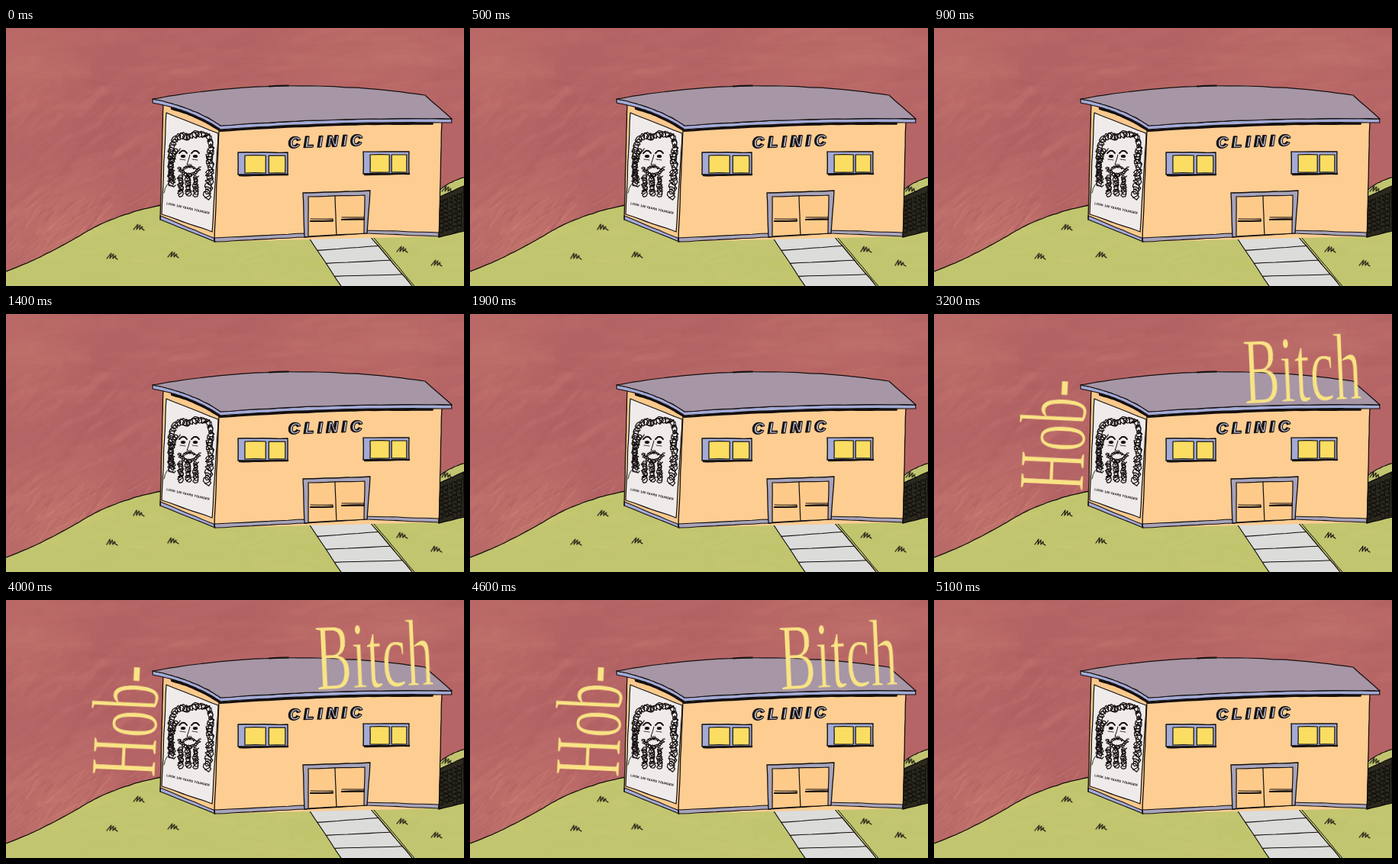
Recreate the animation shown at these times as an HTML page with a canvas. Size 600 by 338 pixels, loop 5200 ms.

```html
<!DOCTYPE html>
<html lang="en">
<head>
<meta charset="utf-8">
<title>Clinic</title>
<style>
  html, body { margin: 0; width: 100%; height: 100%; overflow: hidden; background: #b66566; }
  canvas, svg { position: absolute; left: 0; top: 0; width: 600px; height: 338px; }
  .title { font: 125px "Liberation Serif", "Times New Roman", serif; }
  .sign { font: italic bold 20px "Liberation Sans", Arial, sans-serif; letter-spacing: 5.8px; }
  .slogan { font: bold 4.2px "Liberation Sans", Arial, sans-serif; }
</style>
</head>
<body>
<canvas id="paint" width="600" height="338"></canvas>
<svg id="stage" viewBox="0 0 600 338"></svg>
<script>
const LOOP = 5200, STEP = 100;
const INK = '#14100f', WALL = '#fdcd92', SIDE = '#fac98c', BLUE = '#a3aad6',
      TRIM = '#a6a3bb', ROOF = '#a696a6', PANE = '#fbdd62', PAPER = '#efebea';

let seed = 11;
const rnd = () => (seed = (seed * 16807) % 2147483647) / 2147483647;
const span = (a, b) => a + rnd() * (b - a);
const mix = (a, b, t) => [a[0] + (b[0] - a[0]) * t, a[1] + (b[1] - a[1]) * t];

// Point lists: parse, bend between two ends, move, box.
const pts = s => s.split(' ').map(p => p.split(',').map(Number));
const bend = (a, c, b, n = 12) => Array.from({ length: n + 1 }, (_, i) =>
  mix(mix(a, c, i / n), mix(c, b, i / n), i / n));
const shift = (list, dx, dy) => list.map(([x, y]) => [x + dx, y + dy]);
const box = (x, y, w, h) => [[x, y], [x + w, y], [x + w, y + h], [x, y + h]];

const stage = document.getElementById('stage');
function el(tag, attrs, parent = stage) {
  const node = document.createElementNS('http://www.w3.org/2000/svg', tag);
  for (const key in attrs) node.setAttribute(key, attrs[key]);
  return parent.appendChild(node);
}
function label(text, attrs, parent) {
  const node = el('text', attrs, parent);
  node.textContent = text;
  return node;
}
const stroke = (d, width, parent) => el('path', { d, fill: 'none', stroke: INK,
  'stroke-width': width, 'stroke-linecap': 'round', 'stroke-linejoin': 'round' }, parent);
const fill = (list, color) => el('path', { d: `M${list}Z`, fill: color });

// A slightly shaky pen line.
function ink(list, width = 1.2, shake = .7) {
  let d = 'M' + list[0];
  for (let i = 1; i < list.length; i++) {
    const a = list[i - 1], b = list[i];
    const n = Math.ceil(Math.hypot(b[0] - a[0], b[1] - a[1]) / 30);
    for (let k = 0; k < n; k++) {
      const [cx, cy] = mix(a, b, (k + .5) / n);
      d += `Q${cx + span(-shake, shake)},${cy + span(-shake, shake)} ${mix(a, b, (k + 1) / n)}`;
    }
  }
  return stroke(d, width);
}
function shape(list, color, width) {
  fill(list, color);
  ink([...list, list[0]], width);
}

// Curly pen loops that follow a line.
function curls(list, radius, dense = 1.7) {
  const loops = [];
  for (let i = 1; i < list.length; i++) {
    const a = list[i - 1], b = list[i];
    const n = Math.ceil(Math.hypot(b[0] - a[0], b[1] - a[1]) * dense);
    for (let k = 0; k < n; k++) {
      const [x, y] = mix(a, b, k / n), r = radius * span(.4, 1.1), turn = loops.length * .9;
      loops.push([x + r * Math.cos(turn), y + r * Math.sin(turn)]);
    }
  }
  stroke('M' + loops.join('L'), 1.2);
}

const horizon = [...bend([0, 319], [48, 301], [100, 270]), ...bend([100, 270], [142, 244], [204, 232])];
const ridge = bend([566, 214], [582, 200], [600, 196]);

function paintBackdrop() {
  const c = document.getElementById('paint').getContext('2d');
  c.lineCap = 'round';
  const blob = (x, y, r, color) => {
    const g = c.createRadialGradient(x, y, 0, x, y, r);
    g.addColorStop(0, `rgba(${color},.4)`);
    g.addColorStop(1, `rgba(${color},0)`);
    c.fillStyle = g;
    c.fillRect(0, 0, 600, 338);
  };
  const brush = (count, x0, y0, x1, y1, len, angle, light, dark, alpha, wide) => {
    for (let i = 0; i < count; i++) {
      const x = span(x0, x1), y = span(y0, y1), a = angle + span(-.3, .3), l = span(.4, 1) * len;
      c.strokeStyle = `rgba(${i % 2 ? light : dark},${alpha})`;
      c.lineWidth = span(.2, 1) * wide;
      c.beginPath();
      c.moveTo(x, y);
      c.lineTo(x + l * Math.cos(a), y + l * Math.sin(a));
      c.stroke();
    }
  };
  c.fillStyle = '#b66566';
  c.fillRect(0, 0, 600, 338);
  blob(150, 100, 130, '168,88,94');
  blob(30, 50, 100, '198,118,106');
  blob(470, 0, 150, '196,116,106');
  blob(70, 270, 110, '208,134,116');
  const rose = '204,130,116', wine = '168,88,94';
  brush(140, -40, 0, 600, 110, 90, -.1, rose, wine, .08, 18);
  brush(140, -30, 90, 200, 290, 60, -.65, rose, wine, .1, 12);
  brush(130, -20, 230, 180, 310, 34, -.75, '214,146,126', wine, .2, 3);

  c.beginPath();
  [...horizon, ...ridge, [600, 338], [0, 338]].forEach(p => c.lineTo(...p));
  c.clip();
  c.fillStyle = '#c2c56f';
  c.fillRect(0, 0, 600, 338);
  brush(120, -40, 235, 600, 338, 70, -.12, '208,206,126', '180,186,98', .08, 12);
}

function drawGround() {
  ink(horizon, 1.3);
  ink(ridge);
  shape(pts('567,222 600,207 600,266 567,274'), '#2b2a1e', 1.4);
  for (let x = 571; x < 600; x += 6) curls([[x, 226 - (x - 567) / 2.5], [x, 270 - (x - 567) / 5]], 3, 1.2);

  const left = [[397, 275], [439, 338]], right = [[474, 269], [532, 338]];
  fill([...left, right[1], right[0]], '#dcdcdb');
  ink(left);
  ink(right);
  ink(shift(right, 3, 0), 1);
  for (let t = .26; t < 1; t += .27) ink([mix(...left, t), mix(...right, t - .02)], 1.1);
}

function drawWalls() {
  fill(pts('206,100 280,132 274,280 202,251'), SIDE);
  fill(pts('279,132 571,122 567,273 273,280'), WALL);
  shape(pts('202,246 272,275 274,280 202,251'), BLUE, 1.1);
  shape(pts('273,275 394,269 394,274 274,280'), TRIM, 1.1);
  shape(pts('473,265 567,268 567,273 473,269'), TRIM, 1.1);
  ink(pts('206,100 202,251'), 1.3);
  ink(pts('279,134 273,280'), 1.3);
  ink(pts('571,124 567,273'), 1.3);
}

function drawRoof() {
  const top = bend([192, 93], [370, 61], [549, 88]);
  const eaves = [...bend([192, 93], [245, 103], [281, 128]), ...bend([281, 128], [430, 117], [584, 119])];
  const under = shift(eaves, 0, 5);
  ink(shift(eaves, 0, 6.5).slice(3, -1), 3.2);
  shape([...eaves, ...under.reverse()], BLUE, 1.2);
  shape([...top, ...eaves.slice().reverse()], ROOF, 1.2);
  ink(pts('345,76.5 370,75.5'), 2);
}

function drawPortrait() {
  const at = (x, y) => [x, y];
  curls(bend([218, 206], [208, 132], [238, 143]), 4.8);
  curls(bend([234, 144], [278, 126], [266, 172]), 5);
  curls(bend([267, 166], [268, 200], [263, 222]), 5.4);
  curls(bend([224, 158], [212, 176], [217, 204]), 4.2);
  for (const x of [228, 238, 248]) curls([at(x, 194), at(x + 1, 219)], 4, 2.4);
  curls(bend([226, 183], [240, 202], [254, 183]), 2.6, 2.2);
  curls(bend([232, 185], [240, 178], [248, 185]), 1.5, 2.4);
  for (const x of [232, 248]) {
    ink(bend([x - 5, 164], [x, 157], [x + 5, 164], 3), 2);
    el('ellipse', { cx: x, cy: 168, rx: 3.2, ry: 2, fill: INK });
    ink([at(x - 4, 172), at(x + 3, 173)], .8);
  }
  ink(pts('241,166 237,179 243,179'), 1);
  ink(bend([214, 202], [208, 207], [207, 216], 3), .9);
}

function drawPoster() {
  shape(pts('210,111 278,138 270,267 204,244'), PAPER, 1.2);
  drawPortrait();
  label('LOOK 100 YEARS YOUNGER', { class: 'slogan', fill: INK,
    transform: 'translate(210,231) rotate(13)' });
}

function drawWindow(x, y, w, h) {
  shape(box(x, y, w, h), BLUE, 1.4);
  shape(box(x + 9, y + 4, w * .42, h - 6), PANE, 1.2);
  shape(box(x + w * .62, y + 4, w * .33, h - 6), PANE, 1.2);
  ink([[x + 2, y + h + 1], [x + w, y + h]], 2.4);
}

function drawDoor() {
  shape(pts('389,216 477,213 473,269 391,274'), TRIM, 1.3);
  shape(pts('396,221 470,219 469,269 396,273'), '#fdca8a', 1.2);
  ink(pts('431,220 433,271'));
  for (const [x, y] of [[399, 250], [440, 248]]) {
    ink(box(x, y, 29, 3), 1.1);
    ink([[x, y + 3], [x + 29, y + 2.5]], 2.2);
  }
}

function drawSign() {
  for (const [dx, width, color] of [[-1, 2, INK], [.6, 1, '#b9b9cc']])
    label('CLINIC', { class: 'sign', fill: color, stroke: INK, 'stroke-width': width,
      transform: `translate(${371 + dx},157) rotate(-2)` });
}

// Keyframes that jump at every step of the loop.
function stepped(node, pose) {
  const count = LOOP / STEP;
  const frames = Array.from({ length: count + 1 }, (_, i) =>
    ({ offset: i / count, easing: 'steps(1, end)', ...pose(i % count) }));
  node.animate(frames, { duration: LOOP, iterations: Infinity });
}

function drawTuft([x, y]) {
  const spot = el('g', { transform: `translate(${x},${y})` });
  const blades = stroke('M-7,3L-2,-4L-3,3L1,-3L1,3L4,-1L4,2L7,4', 1.15, spot);
  stepped(blades, i => {
    const sway = Math.round(1.4 * Math.cos(i * Math.PI / 5));
    return { transform: `translateX(${sway * .4}px) skewX(${-6 * sway}deg)` };
  });
}

function drawTitle(word, x, y, angle, from, to) {
  // The mask trims the glyph edges for a lighter weight.
  const mask = el('mask', { id: 'trim-' + word, maskUnits: 'userSpaceOnUse',
    x: -50, y: -150, width: 450, height: 250 });
  label(word, { class: 'title', fill: '#fff', stroke: '#000', 'stroke-width': 1.5 }, mask);
  const title = el('g', { transform: `translate(${x},${y}) rotate(${angle}) scale(.57,1)` });
  label(word, { class: 'title', fill: '#f9e384', mask: `url(#trim-${word})` }, title);
  stepped(title, i => ({ opacity: +(i * STEP >= from && i * STEP < to) }));
}

paintBackdrop();
drawGround();
drawWalls();
drawPoster();
drawRoof();
drawWindow(304, 163, 65, 29);
drawWindow(468, 162, 60, 29);
drawDoor();
drawSign();
pts('174,261 139,299 219,297 519,290 564,308 578,211').forEach(drawTuft);
drawTitle('Hob-', 194.5, 233, -87.3, 2100, 5000);
drawTitle('Bitch', 407, 118, -2.6, 2700, 5000);
</script>
</body>
</html>
```
